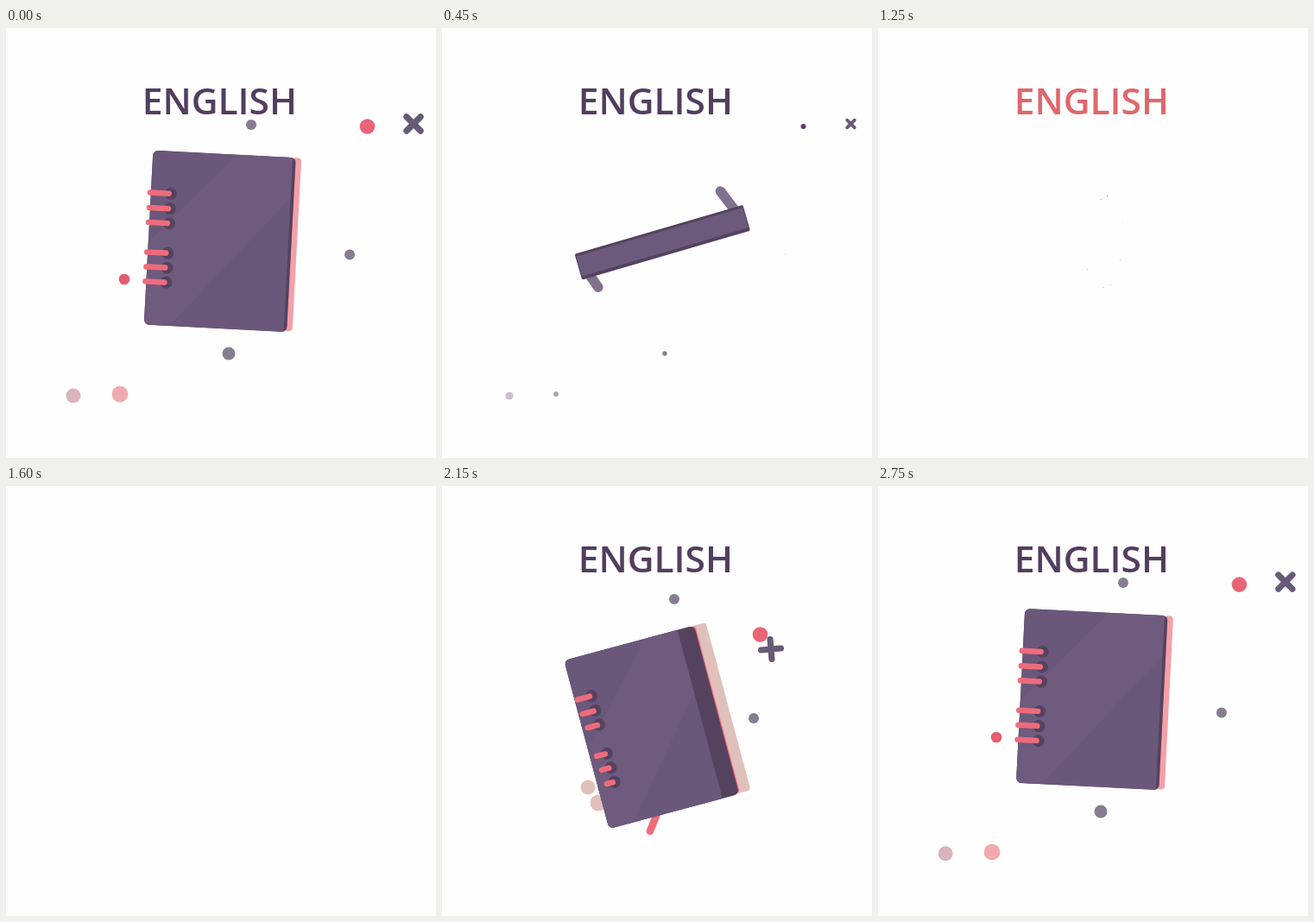
An HTML page with a canvas that plays this animation: 498x498 px, repeating every 2.8 s.

```html
<!DOCTYPE html>
<html lang="en">
<head>
<meta charset="utf-8">
<title>English notebook</title>
<style>
html, body { margin: 0; width: 100%; height: 100%; overflow: hidden; background: #fefefe; }
canvas { display: block; width: 498px; height: 498px; }
</style>
</head>
<body>
<canvas id="stage" width="498" height="498"></canvas>
<script>
const ctx = document.getElementById('stage').getContext('2d');
const LOOP = 2800, STEP = 50;
const PURPLE = [82, 62, 94], ROSE = [222, 103, 108], SPINE = [107, 90, 123], PINK = [240, 108, 126];
const GREY = [135, 125, 144], BEIGE = [224, 192, 187];
const DARK = '#54425f', RED = '#ef6b7c', RIBBON = '#80718c';

const clamp = (v, a = 0, b = 1) => Math.min(b, Math.max(a, v));
const lerp = (a, b, u) => a + (b - a) * u;
const span = (t, a, b) => clamp((t - a) / (b - a));
const smooth = u => u * u * (3 - 2 * u);
const mix = (a, b, u) => `rgb(${a.map((v, i) => Math.round(lerp(v, b[i], u))).join(',')})`;

// Rest position, offset shortly after the burst, radius, colours over time, shrunken size
const specks = [
  { x: 284, y: 112, dx: -15, dy: 19, r: 6, color: GREY, end: 0 },
  { x: 398, y: 262.5, dx: -37, dy: 6.5, r: 6, color: GREY, end: .08 },
  { x: 258, y: 377, dx: 4, dy: -33, r: 7.5, color: GREY, end: .36 },
  { x: 418.5, y: 114, dx: -50, dy: 58, r: 8.8, color: [232, 101, 118], last: [91, 60, 100], end: .34 },
  { x: 137, y: 291, dx: 36, dy: -20, r: 6.3, color: [229, 93, 111], end: 0 },
  { x: 78, y: 426, dx: 91, dy: -77, r: 8.5, first: BEIGE, color: [218, 180, 185], last: [207, 190, 211], end: .54 },
  { x: 132, y: 424, dx: 49, dy: -57, r: 9.4, first: BEIGE, color: [240, 170, 176], last: [174, 164, 174], end: .32 },
  { x: 472, y: 111, dx: -91, dy: 78, r: 11.5, color: [103, 90, 118], end: .53, cross: true }
];

const sparks = [
  [2, -33, 2], [7, -35.5, 2.4, true], [19, -15, 1], [17, 14, 1.4],
  [-8.5, 21, 1.4], [-18.5, -19, .7], [4, 35, 1.8], [9.5, 33, 1.7]
];

function dot(x, y, r, color) {
  ctx.fillStyle = color;
  ctx.beginPath();
  ctx.arc(x, y, Math.max(0, r), 0, Math.PI * 2);
  ctx.fill();
}

function line(points, width, color) {
  ctx.strokeStyle = color;
  ctx.lineWidth = width;
  ctx.lineCap = ctx.lineJoin = 'round';
  ctx.beginPath();
  points.forEach(([x, y]) => ctx.lineTo(x, y));
  ctx.stroke();
}

function box(x, y, w, h, radius, color) {
  ctx.fillStyle = color;
  ctx.beginPath();
  ctx.roundRect(x, y, w, h, radius);
  ctx.fill();
}

function place(x, y, degrees, sx, sy, paint) {
  ctx.save();
  ctx.translate(x, y);
  ctx.rotate(degrees * Math.PI / 180);
  ctx.scale(sx, sy);
  paint();
  ctx.restore();
}

function cross(x, y, arm, degrees, color) {
  if (arm <= 0) return;
  place(x, y, degrees, 1, 1, () => {
    line([[-arm, 0], [arm, 0]], arm * .62, color);
    line([[0, -arm], [0, arm]], arm * .62, color);
  });
}

function title(t) {
  const opening = t >= 1800;
  ctx.globalAlpha = opening ? span(t, 1800, 2050) : 1 - span(t, 1250, 1600);
  ctx.fillStyle = mix(PURPLE, ROSE, opening ? 0 : smooth(span(t, 450, 850)));
  ctx.font = '600 42.5px "Open Sans", "Noto Sans", sans-serif';
  ctx.textAlign = 'center';
  ctx.fillText('ENGLISH', 247.3, 99.7);
  ctx.globalAlpha = 1;
}

// turn: 0 faces the viewer, 1 shows the fore edge
function book(turn, detail) {
  const left = lerp(-86, -85, turn), front = lerp(76, 51, turn);
  const edge = lerp(79.5, 71, turn), pages = lerp(86, 85, turn);
  if (turn > .1) line([[-22, 92], [lerp(-24, -40, turn), lerp(92, 116, turn)]], 8.5, RED);
  box(front, -101, pages - front, 201, 4, mix([243, 160, 167], BEIGE, clamp(turn)));
  box(front, -100, edge + 1.2 * clamp(turn) - front, 199, 3, RED);
  box(left, -101, edge - left, 202, 6, DARK);
  box(left, -101, front - left, 202, [6, 2, 2, 6], '#6a587a');
  ctx.save();
  ctx.clip();
  ctx.fillStyle = 'rgba(113,94,128,.55)';
  ctx.beginPath();
  ctx.moveTo(-90, 10);
  ctx.lineTo(15, -105);
  ctx.lineTo(85, -105);
  ctx.lineTo(85, -65);
  ctx.lineTo(-60, 105);
  ctx.lineTo(-90, 105);
  ctx.fill();
  ctx.restore();
  ctx.globalAlpha *= detail;
  [-52, -34.5, -17.5, 17, 34, 51].forEach((y, i) => {
    const x = -63 - 2 * turn;
    dot(x, y - turn, 7, DARK);
    line([[lerp(-87, -82 + i * 1.6, turn), y - turn], [x - 2, y - turn]], 6.5, RED);
  });
}

function bar(length, thickness, color, fringe) {
  if (fringe > 0) {
    line([[-15 * fringe, -90], [-38 * fringe, -81]], 11.5, RIBBON);
    line([[14 * fringe, 91], [29 * fringe, 86]], 11.5, RIBBON);
  }
  box(-thickness / 2, -length / 2, thickness, length, 2, DARK);
  box(-thickness / 2 + 3, -length / 2 + 1, Math.max(0, thickness - 7), length - 2, 0, color);
}

function closingBook(t) {
  const e = smooth(span(t, 0, 450));
  const x = lerp(251, 255.3, e), y = lerp(247, 248.3, e), angle = lerp(3, 73.7, e);
  if (e < .88) {
    place(x, y, angle, lerp(1, .17, e), 1, () => book(0, 1 - span(e, .55, .85)));
    return;
  }
  const v = smooth(span(t, 450, 700));
  if (v < 1) {
    place(x, y, lerp(angle, 88, v), 1, 1, () =>
      bar(lerp(203, 30, v), lerp(31, 9, v), mix(SPINE, PINK, v), 1 - span(t, 450, 600)));
  }
}

function pop(t) {
  if (t < 650 || t > 1450) return;
  const size = smooth(span(t, 650, 850)) * (1 - smooth(span(t, 950, 1250)));
  place(255, 248, -1, size, size, () => {
    ctx.fillStyle = mix(PINK, PINK, 0);
    for (const side of [-1, 1]) {
      ctx.beginPath();
      ctx.moveTo(0, 0);
      ctx.bezierCurveTo(side * 4, -4, side * 8, -5.5, side * 16, -5.5);
      ctx.bezierCurveTo(side * 23, -5.5, side * 23, 5.5, side * 16, 5.5);
      ctx.bezierCurveTo(side * 8, 5.5, side * 4, 4, 0, 0);
      ctx.fill();
    }
  });
  const reach = t < 900 ? Math.sqrt(span(t, 650, 900)) : 1 + .5 * span(t, 900, 1200);
  const fade = span(t, 700, 850) * (1 - span(t, 1000, 1350));
  sparks.forEach(([x, y, r, plus], i) => {
    const px = 255 + x * reach, py = 248 + y * reach;
    if (plus) cross(px, py, r * fade, 0, '#d9566a');
    else dot(px, py, r * fade, i > 5 ? '#eda83c' : '#df586a');
  });
}

function openingBook(t) {
  const k = ((LOOP - t) / 650) ** 2;
  const size = 1 - (1 - span(t, 1800, 1975)) ** 2;
  place(251 - 1.5 * k, 247 + 30.5 * k, 3 - 18 * k, size, size, () => book(Math.min(k * k, 1.4), 1));
}

function scatter(t) {
  const closing = t < 1800;
  const away = closing ? 0 : ((LOOP - t) / 650) ** 2.45;
  const shrink = closing ? t / 450 : 0;
  for (const s of specks) {
    const scale = closing ? 1 - (1 - s.end) * shrink ** 2 : span(t, 1850, 2050);
    const r = s.r * scale;
    if (r < .2) continue;
    const x = s.x + s.dx * away, y = s.y + s.dy * away;
    const color = closing
      ? mix(s.color, s.last || s.color, smooth(clamp(shrink)))
      : mix(s.color, s.first || s.color, clamp(away));
    if (s.cross) {
      const spin = closing ? 45 : 45 + Math.max(0, 2750 - t) * .217;
      cross(x + clamp(shrink) * 1.5, y, r, spin, color);
    } else dot(x, y, r, color);
  }
}

function draw(t) {
  ctx.fillStyle = '#fefefe';
  ctx.fillRect(0, 0, 498, 498);
  if (t >= 1600 && t < 1850) return;
  scatter(t);
  if (t < 1600) {
    closingBook(t);
    pop(t);
  } else openingBook(t);
  title(t);
}

const start = performance.now();
function frame() {
  const t = (performance.now() - start) % LOOP;
  draw(Math.floor(t / STEP) * STEP);
  requestAnimationFrame(frame);
}
frame();
</script>
</body>
</html>
```
